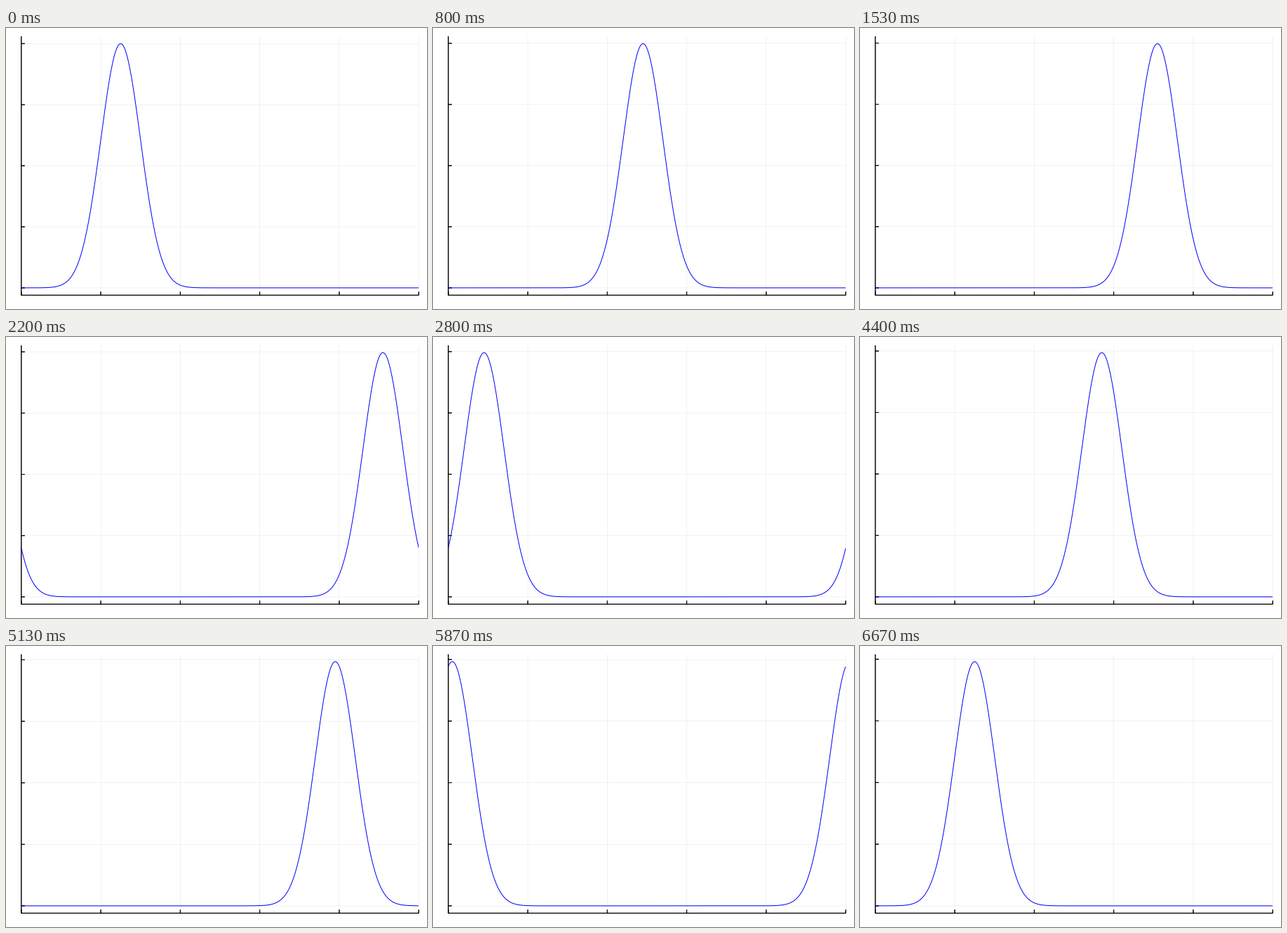
These frames come from a looping animation (600x400 px, 6740 ms). A matplotlib script:

```python
import numpy as np
import matplotlib.pyplot as plt
from matplotlib.animation import FuncAnimation
from matplotlib.patches import Rectangle

W, H, DPI = 600, 400, 100
PX = 72 / DPI                     # one pixel in points
LEFT, RIGHT = 21.8, 588.19        # plot area in pixels
TOP, BOTTOM = 11.81, 380.32
PAD = (BOTTOM - TOP) * 0.03 / 1.06
BASE, PEAK = BOTTOM - PAD, TOP + PAD
TICK = 5

LOOP_MS, TICK_MS = 6740, 20
FPS, LAST = 15, 100               # steps per second, final step
LEAD_MS = 40 / 3                  # rounds step starts to the timer grid
SHIFT = 0.02                      # travel per step, in domain lengths
START, SIGMA = 0.25, 0.05
LOSS = 0.0098                     # amplitude lost over the whole run

fig = plt.figure(figsize=(W / DPI, H / DPI), dpi=DPI, facecolor="white")
ax = fig.add_axes([0, 0, 1, 1])
ax.set_xlim(0, W)
ax.set_ylim(H, 0)
ax.axis("off")


def line(xs, ys, color="black", width=1.0, alpha=1.0, z=2):
    art, = ax.plot(xs, ys, color=color, alpha=alpha, lw=width * PX, zorder=z,
                   solid_capstyle="butt", solid_joinstyle="round")
    art.set_snap(False)
    return art


def grid(xs, ys):
    return line(xs, ys, width=0.5, alpha=0.1, z=1)


def ink(xs, ys):
    # two passes make the antialiased edges darker
    return [line(xs, ys) for _ in range(2)]


for x in np.linspace(LEFT, RIGHT, 6):
    grid([x, x], [TOP, BOTTOM])
    ink([x, x], [BOTTOM, BOTTOM - TICK])

levels = np.linspace(0, 1, 5)
rows = [[grid([LEFT, RIGHT], [BASE, BASE]),
         *ink([LEFT, LEFT + TICK], [BASE, BASE])] for _ in levels]

ink([LEFT, LEFT], [TOP, BOTTOM])
ink([LEFT, RIGHT], [BOTTOM, BOTTOM])

u = np.linspace(0, 1, 501)
curve = line(LEFT + u * (RIGHT - LEFT), np.full_like(u, BASE), "#0000ff", z=3)
curve.set_clip_path(Rectangle((LEFT, TOP), RIGHT - LEFT, BOTTOM - TOP,
                              transform=ax.transData))


def step_at(ms):
    return min(int((ms + LEAD_MS) * FPS / 1000 + 1e-6), LAST)


def draw(frame):
    step = step_at(frame * TICK_MS)
    amp = 1 - LOSS * step / LAST
    unit = (BASE - PEAK) / amp    # the y axis follows the shrinking peak
    for level, arts in zip(levels, rows):
        y = BASE - level * unit
        for art in arts:
            art.set_ydata([y, y])
    centre = START + SHIFT * step
    dist = (u - centre + 0.5) % 1 - 0.5
    pulse = amp * np.exp(-0.5 * (dist * amp / SIGMA) ** 2)
    curve.set_ydata(BASE - unit * pulse)
    return [curve] + [art for arts in rows for art in arts]


anim = FuncAnimation(fig, draw, frames=LOOP_MS // TICK_MS,
                     init_func=lambda: draw(0), interval=TICK_MS,
                     repeat=True, repeat_delay=0)
plt.show()
```
